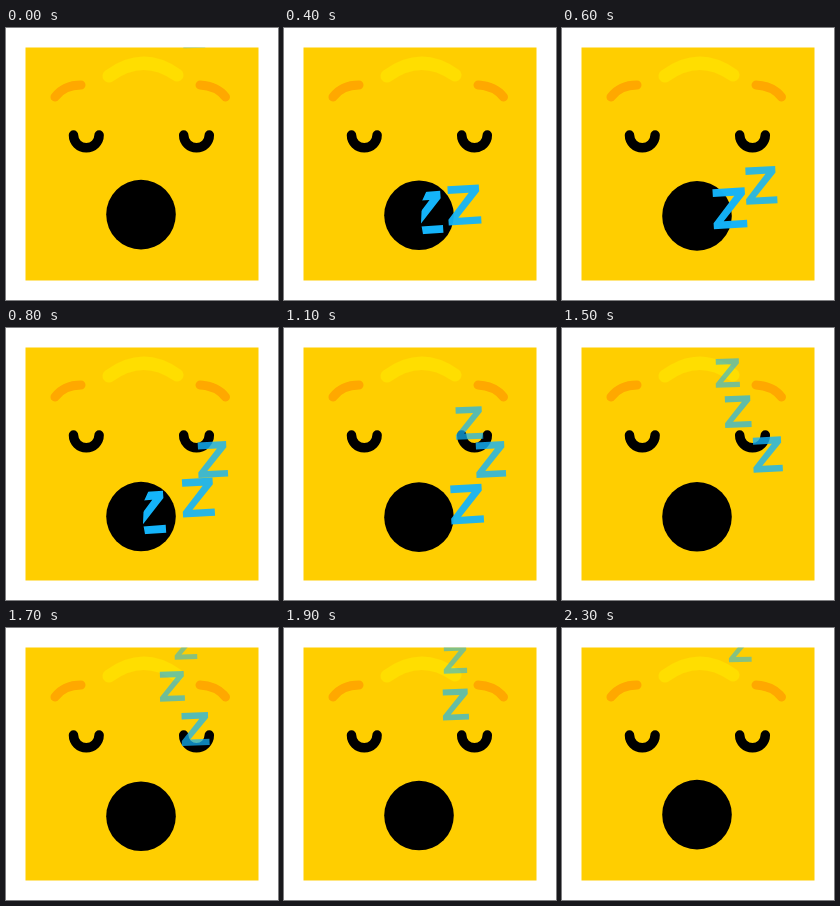
Recreate the animation shown at these times as an HTML page. Size 272 px wide and 272 px high, loop 2500 ms.

```html
<!DOCTYPE html>
<html lang="en">
<head>
<meta charset="utf-8">
<title>Sleepy face</title>
<style>
  html, body { margin: 0; width: 100%; height: 100%; overflow: hidden; background: #fff; }
  svg { display: block; width: 100vw; height: 100vh; }
  .line { fill: none; stroke-linecap: round; }
</style>
</head>
<body>
<svg viewBox="0 0 272 272">
  <defs>
    <clipPath id="air">
      <path d="M143 162 L138 173 L137 195 L139.5 209 H252.5 V19.5 H143 Z"/>
    </clipPath>
    <path id="zed" d="M-17 -21.5 H17.5 V-14 L-7 13.5 H18 V21.5 H-18 V15 L6 -13 H-17 Z"/>
  </defs>
  <rect x="19.5" y="19.5" width="233" height="233" fill="#ffce00"/>
  <path class="line" d="M103 48 Q137 23 171 47" stroke="#ffde00" stroke-width="13"/>
  <g class="line" stroke="#ffa800" stroke-width="9">
    <path d="M49 69 Q58 57 75 57"/>
    <path d="M194 57 Q211 58 219.5 69"/>
  </g>
  <g class="line" stroke="#000" stroke-width="9.5">
    <path d="M67.5 107 A12.8 12.8 0 0 0 93.1 107"/>
    <path d="M177.7 107 A12.8 12.8 0 0 0 203.3 107"/>
  </g>
  <circle id="mouth" cx="135" cy="187" r="34.8"/>
  <g clip-path="url(#air)" fill="#14b4fa">
    <use class="z" href="#zed"/>
    <use class="z" href="#zed"/>
    <use class="z" href="#zed"/>
  </g>
</svg>
<script>
const LOOP = 2500, STEP = 100, STEPS = 24;
const mouth = document.getElementById('mouth');
const zeds = [...document.querySelectorAll('.z')];
const drifts = [
  { start: 0, speed: 1 },
  { start: 3, speed: 1 },
  { start: 7, speed: 1.05 }
];

// Drift path: [age, x, y]
const path = [
  [0, 118, 187], [1, 140.5, 185], [4, 180, 177], [5, 192, 169.5],
  [8, 206.5, 131.5], [11, 185, 95], [12.6, 171.5, 76.5], [15, 165.5, 45],
  [16.8, 178, 20.5], [17.85, 188, 7], [19, 198, -10]
];

function slope(i, axis) {
  const a = path[Math.max(i - 1, 0)];
  const b = path[Math.min(i + 1, path.length - 1)];
  return (b[axis] - a[axis]) / (b[0] - a[0]);
}

function along(age, axis) {
  let i = 0;
  while (i < path.length - 2 && age > path[i + 1][0]) i++;
  const a = path[i], b = path[i + 1], span = b[0] - a[0];
  const u = (age - a[0]) / span, v = 1 - u;
  return v * v * (1 + 2 * u) * a[axis] + u * u * (3 - 2 * u) * b[axis]
    + span * u * v * (v * slope(i, axis) - u * slope(i + 1, axis));
}

function placeZed(zed, age) {
  const visible = age > 0 && age < 19;
  zed.setAttribute('visibility', visible ? 'visible' : 'hidden');
  if (!visible) return;
  const x = along(age, 1), y = along(age, 2);
  zed.setAttribute('transform',
    `translate(${x} ${y}) rotate(${-4 + 0.15 * age}) scale(${1 - 0.022 * age})`);
  zed.setAttribute('opacity', Math.min(1, 1.08 - 0.034 * age));
}

function draw(time) {
  // The last step is held until the loop ends
  const step = Math.min(Math.floor((time % LOOP) / STEP), STEPS - 1);
  mouth.setAttribute('cy', 187.9 - 1.3 * Math.cos(2 * Math.PI * step / STEPS));
  drifts.forEach(({ start, speed }, i) =>
    placeZed(zeds[i], (step - start + STEPS) % STEPS * speed));
}

const begin = performance.now();
function tick() {
  draw(performance.now() - begin);
  requestAnimationFrame(tick);
}
tick();
</script>
</body>
</html>
```
